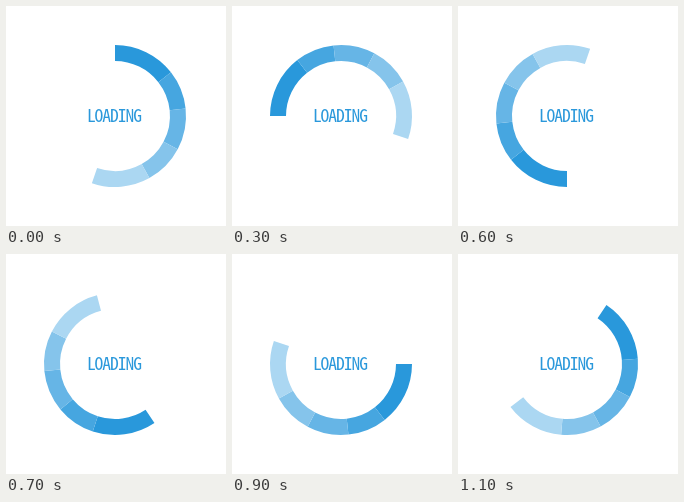
Animation, 220 px wide and 220 px high, one loop 1200 ms. Source, as an HTML page:

```html
<!DOCTYPE html>
<html lang="en">
<head>
<meta charset="utf-8">
<title>Loading</title>
<style>
  html, body { margin: 0; width: 100%; height: 100%; overflow: hidden; background: #fff; }
  svg { display: block; width: 220px; height: 220px; }
  /* Half-width Latin capitals give a condensed look */
  text {
    font: 400 17.5px "Noto Sans CJK JP", "Noto Sans CJK SC", "Noto Sans CJK", sans-serif;
    font-feature-settings: "hwid";
    letter-spacing: -1px;
    fill: #2a98db;
    text-anchor: middle;
  }
</style>
</head>
<body>
<svg viewBox="0 0 220 220">
  <g id="ring" fill="none" stroke-width="16"></g>
  <text x="108" y="116">LOADING</text>
</svg>
<script>
  const CX = 109, CY = 110, RADIUS = 63;
  const LOOP = 1200, STEPS = 12;
  const STOPS = 32; // resting angles around the circle

  // Clockwise from the head: end angle and colour of each band
  const bands = [
    [52, '#2998db'],
    [84, '#46a6e0'],
    [118, '#66b5e6'],
    [151, '#85c4eb'],
    [199, '#abd7f2']
  ];

  const ring = document.getElementById('ring');

  function point(deg) {
    const a = deg * Math.PI / 180;
    return `${CX + RADIUS * Math.sin(a)} ${CY - RADIUS * Math.cos(a)}`;
  }

  let start = 0;
  for (const [end, color] of bands) {
    const arc = document.createElementNS('http://www.w3.org/2000/svg', 'path');
    arc.setAttribute('d', `M${point(start)}A${RADIUS} ${RADIUS} 0 0 1 ${point(end)}`);
    arc.setAttribute('stroke', color);
    ring.append(arc);
    start = end;
  }

  function draw(now) {
    const step = Math.floor((now % LOOP) / LOOP * STEPS);
    const stop = Math.round(step * STOPS / STEPS);
    ring.setAttribute('transform', `rotate(${-stop * 360 / STOPS} ${CX} ${CY})`);
    requestAnimationFrame(draw);
  }
  draw(performance.now());
</script>
</body>
</html>
```
